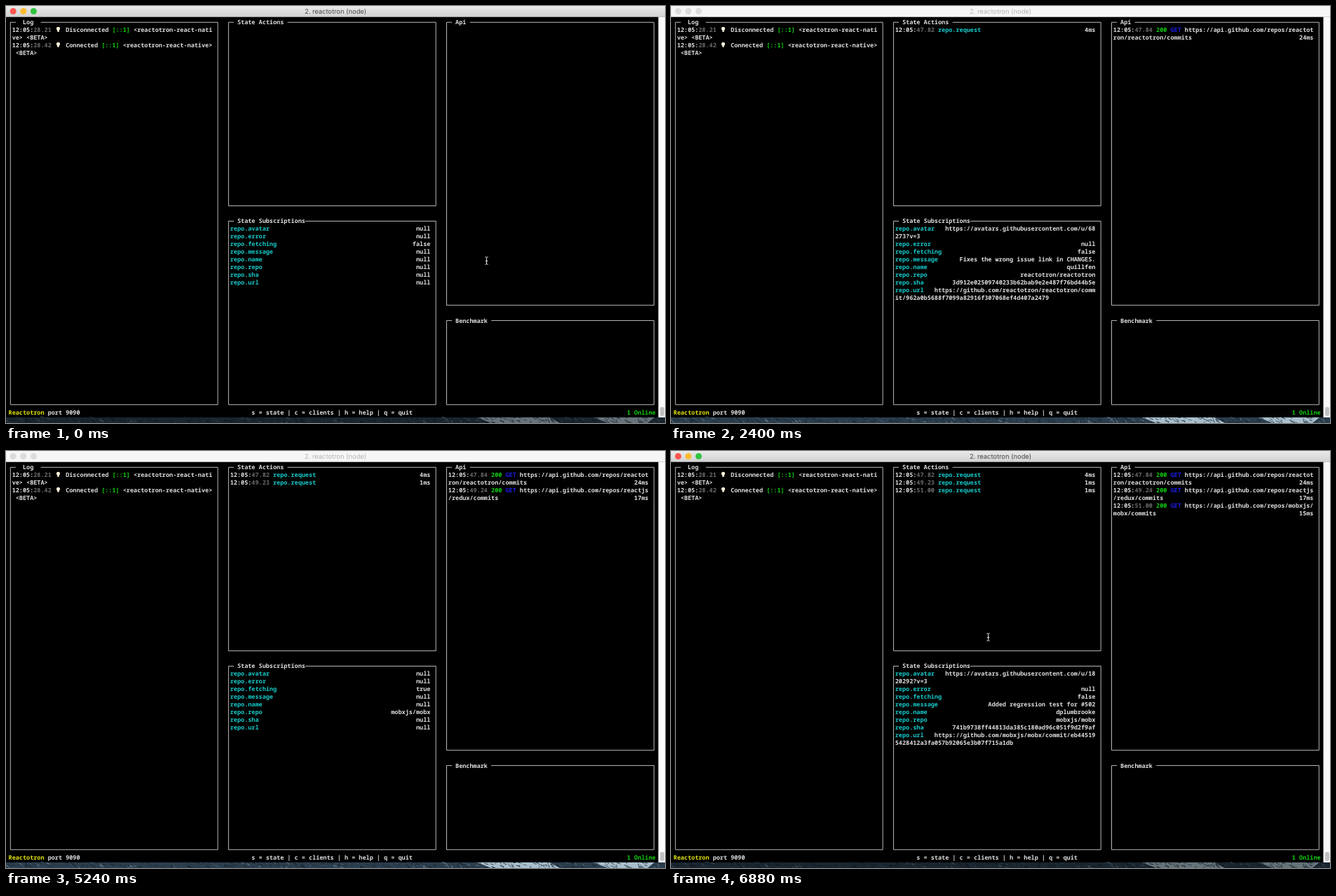
Recreate the animation shown at these times as an HTML page. Size 940 by 596 pixels, loop 8000 ms.

```html
<!DOCTYPE html>
<html lang="en">
<head>
<meta charset="utf-8">
<title>Terminal dashboard</title>
<style>
html, body { margin: 0; width: 100%; height: 100%; overflow: hidden; background: #000; }
svg { display: block; width: 100vw; height: 100vh; }
text { white-space: pre; text-rendering: geometricPrecision; }
.mono { font: 600 8.5px "Noto Sans Mono", "DejaVu Sans Mono", monospace; }
.title { font: 400 9.35px Inter, Roboto, sans-serif; text-anchor: middle; }
</style>
</head>
<body>
<svg id="stage" viewBox="0 0 940 596" xmlns="http://www.w3.org/2000/svg">
  <defs>
    <linearGradient id="bar" x2="0" y2="1">
      <stop stop-color="#e9e9e9"/><stop offset="1" stop-color="#d2d2d2"/>
    </linearGradient>
  </defs>
  <rect width="940" height="596"/>
  <g id="desk"></g>
  <rect id="shade" y="588" width="940" height="8" opacity=".4"/>
  <g id="chrome"></g>
  <rect x="930.5" y="15.5" width="9.5" height="572.5" fill="#fafafa"/>
  <rect x="933" y="573" width="6" height="13" rx="3" fill="#c1c1c1"/>
  <g id="panels" class="mono"></g>
  <g id="content" class="mono"></g>
  <path id="beam" d="M-2 -5.5Q0 -5.5 0 -3.5Q0 -5.5 2 -5.5M0 -3.5V3.5M-2 5.5Q0 5.5 0 3.5Q0 5.5 2 5.5M-1.7 .5H1.7" fill="none" stroke="#e0e0e0"/>
  <path id="arrow" d="M.5 .7V11l2.4-2.2 1.7 3.8 1.7-.8-1.7-3.5h3.1z" fill="#000" stroke="#fff" stroke-width=".9"/>
</svg>
<script>
const LOOP = 8000;
const CELL = 5.1, ROW = 10.93, LEFT = 3.55, TOP = 26.3;
const WHITE = '#dedede', GREY = '#6c6c6c', CYAN = '#16cbcb',
      GREEN = '#0fd10f', BLUE = '#1c1ce8', YELLOW = '#e2e20c';
const $ = id => document.getElementById(id);
const escapeXml = s => s.replace(/&/g, '&amp;').replace(/</g, '&lt;');

// Text on the terminal's character grid
const put = (col, row, str, color = WHITE) =>
  `<text x="${(LEFT + col * CELL).toFixed(2)}" y="${(TOP + row * ROW).toFixed(2)}" fill="${color}">${escapeXml(str)}</text>`;
const putRight = (end, row, str) => put(end - str.length, row, str);
const stamp = (col, row, sec) => put(col, row, '12:05:') + put(col + 6, row, sec, GREY);

const keys = ['avatar', 'error', 'fetching', 'message', 'name', 'repo', 'sha', 'url'];
const requests = [
  { repo: 'reactotron/reactotron', logged: 2100, action: ['47.82', '4ms'], api: ['47.84', '24ms'],
    avatar: '68273', message: 'Fixes the wrong issue link in CHANGES.', name: 'quillfen',
    sha: '3d912e02509740233b62bab9e2e487f76bd44b5e', commit: '962a0b5688f7099a82916f307068ef4d407a2479' },
  { repo: 'reactjs/redux', logged: 3600, action: ['49.23', '1ms'], api: ['49.24', '17ms'],
    avatar: '1128784', message: 'Merge pull request #1900 from inkfolder/master\n\nFixed a typo', name: 'harlovensen',
    sha: 'dee4470d1a4f978d47a9354b66d446450da0acbd', commit: '14834591ea8525e373b5ab660af406d8cc847358' },
  { repo: 'mobxjs/mobx', logged: 5380, action: ['51.00', '1ms'], api: ['51.00', '15ms'],
    avatar: '1820292', message: 'Added regression test for #502', name: 'dplumbrooke',
    sha: '741b9738ff44813da385c180ad96c051f9d2f9af', commit: 'eb445195428412a3fa057b92065e3b07f715a1db' }
];

// [time, request index, loaded]
const fetches = [
  [2100, 0, false], [2400, 0, true], [3600, 1, false],
  [3740, 1, true], [5240, 2, false], [5530, 2, true]
];

// [time, shape, x, y]
const pointer = [
  [0, 'beam', 685.5, 364], [1050, 'beam', 685.5, 363], [1200, 'beam', 839.5, 294], [1350, ''],
  [6430, 'arrow', 884, 265], [6580, 'arrow', 490, 270], [6730, 'arrow', 464, 268.5],
  [6880, 'beam', 452.5, 266]
];

const latest = (list, t) => list.filter(e => e[0] <= t).pop();

function subscriptions(t) {
  const [, index, loaded] = latest(fetches, t) || [0, -1, false];
  const req = requests[index];
  const state = { fetching: String(!!req && !loaded) };
  if (req) state.repo = req.repo;
  if (loaded) Object.assign(state, {
    avatar: `https://avatars.githubusercontent.com/u/${req.avatar}?v=3`,
    message: req.message, name: req.name, sha: req.sha,
    url: `https://github.com/${req.repo}/commit/${req.commit}`
  });
  let row = 27, out = '';
  for (const key of keys) {
    const label = 'repo.' + key, value = state[key] || 'null';
    const gap = Math.max(3, 56 - label.length - value.length);
    const lines = (' '.repeat(label.length + gap) + value).split('\n')
      .flatMap(line => line.match(/.{1,56}/g) || ['']);
    out += put(62, row, label, CYAN);
    for (const line of lines) {
      const text = line.trimStart();
      if (text) out += put(62 + line.length - text.length, row, text);
      row++;
    }
  }
  return out;
}

function requestLog(t) {
  return requests.filter(r => r.logged <= t).map((r, i) => {
    const row = 1 + i * 2, url = `https://api.github.com/repos/${r.repo}/commits`;
    return stamp(62, 1 + i, r.action[0]) + put(74, 1 + i, 'repo.request', CYAN) +
      putRight(118, 1 + i, r.action[1]) +
      stamp(123, row, r.api[0]) + put(135, row, '200', GREEN) + put(139, row, 'GET', BLUE) +
      put(143, row, url.slice(0, 36)) + put(123, row + 1, url.slice(36)) +
      putRight(179, row + 1, r.api[1]);
  }).join('');
}

// Box rules run through cell centres; the top rule is open around the title
function panel(title, col, row, lastRow, titleCol, resumeCol) {
  const x = c => (LEFT + .2 + (c + .5) * CELL).toFixed(2);
  const y = r => (TOP - 3 + r * ROW).toFixed(2);
  return `<path d="M${x(col + 1.5)} ${y(row)}H${x(col)}V${y(lastRow)}H${x(col + 58)}V${y(row)}H${x(resumeCol - .5)}" fill="none" stroke="#dcdcdc" stroke-width=".85"/>` +
    put(titleCol, row, title);
}

const bulb = y => `<path d="M73.3 ${y + 1.5}C70.8 ${y - 1} 72 ${y - 3.8} 74.5 ${y - 3.8}S78.2 ${y - 1} 75.7 ${y + 1.5}V${y + 3.4}H73.3Z" fill="#fff6dc"/>`;

function logLine(row, sec, word, head, tail, tailCol) {
  const after = 17 + word.length;
  return stamp(1, row, sec) + bulb(33.6 + (row - 1) * ROW) + put(16, row, word) +
    put(after, row, '[::1]', GREEN) + put(after + 6, row, head) + put(tailCol, row + 1, tail);
}

function buildPanels() {
  $('panels').innerHTML =
    panel('Log', 0, 0, 50, 4, 9) +
    panel('State Actions', 61, 0, 24, 64, 78) +
    panel('State Subscriptions', 61, 26, 50, 64, 83) +
    panel('Api', 122, 0, 37, 125, 129) +
    panel('Benchmark', 122, 39, 50, 125, 135) +
    logLine(1, '28.21', 'Disconnected', '<reactotron-react-nati', 've> <BETA>', 1) +
    logLine(3, '28.42', 'Connected', '<reactotron-react-native>', '<BETA>', 2) +
    put(0, 51, 'Reactotron', YELLOW) + put(11, 51, 'port 9090') +
    put(68, 51, 's = state | c = clients | h = help | q = quit') +
    put(173, 51, '1 Online', GREEN);
}

// Sliver of rocky wallpaper under the window
function buildDesk() {
  let seed = 7;
  const rand = () => (seed = seed * 16807 % 2147483647) / 2147483647;
  const shades = ['#0f1a24', '#1b2b39', '#3c566b', '#7d93a3'];
  let out = '<rect y="588" width="940" height="8" fill="#2a3d4d"/>' +
    '<path d="M672 588H775L790 596H692ZM838 588H925L915 596H858Z" fill="#a9bfcd"/>';
  for (let i = 0; i < 420; i++) {
    const x = rand() * 940, y = 587 + rand() * 8, w = 1 + rand() * 5;
    const color = shades[Math.floor(rand() * 3.4)];
    out += `<path d="M${x.toFixed(1)} ${y.toFixed(1)}l${w.toFixed(1)} ${(1 + rand() * 3).toFixed(1)}" stroke="${color}" opacity=".8"/>`;
  }
  $('desk').innerHTML = out;
}

function drawChrome(active) {
  const lights = active ? ['#fc5650', '#fdbb2f', '#2fc440'] : ['#dcdcdc', '#dcdcdc', '#dcdcdc'];
  $('chrome').innerHTML =
    `<rect width="940" height="15.7" fill="${active ? 'url(#bar)' : '#f6f6f6'}"/>` +
    lights.map((c, i) => `<circle cx="${10.2 + i * 14.6}" cy="7.5" r="4.5" fill="${c}"/>`).join('') +
    `<text class="title" x="470" y="10.8" fill="${active ? '#484848' : '#b4b4b4'}">2. reactotron (node)</text>`;
  $('shade').style.display = active ? '' : 'none';
}

const cuts = [...new Set([1950, ...fetches.map(f => f[0]), ...requests.map(r => r.logged),
  ...pointer.map(p => p[0])])].sort((a, b) => a - b);
let shown = -1;

function draw(t) {
  const cut = cuts.filter(c => c <= t).pop();
  if (cut === shown) return;
  shown = cut;
  drawChrome(t < 1950 || t >= 6880);
  $('content').innerHTML = requestLog(t) + subscriptions(t);
  const [, shape, x, y] = latest(pointer, t);
  for (const id of ['beam', 'arrow']) {
    $(id).style.display = id === shape ? '' : 'none';
    if (id === shape) $(id).setAttribute('transform', `translate(${x} ${y})`);
  }
}

buildDesk();
buildPanels();
const start = performance.now();
function tick() {
  draw((performance.now() - start) % LOOP);
  requestAnimationFrame(tick);
}
tick();
</script>
</body>
</html>
```
